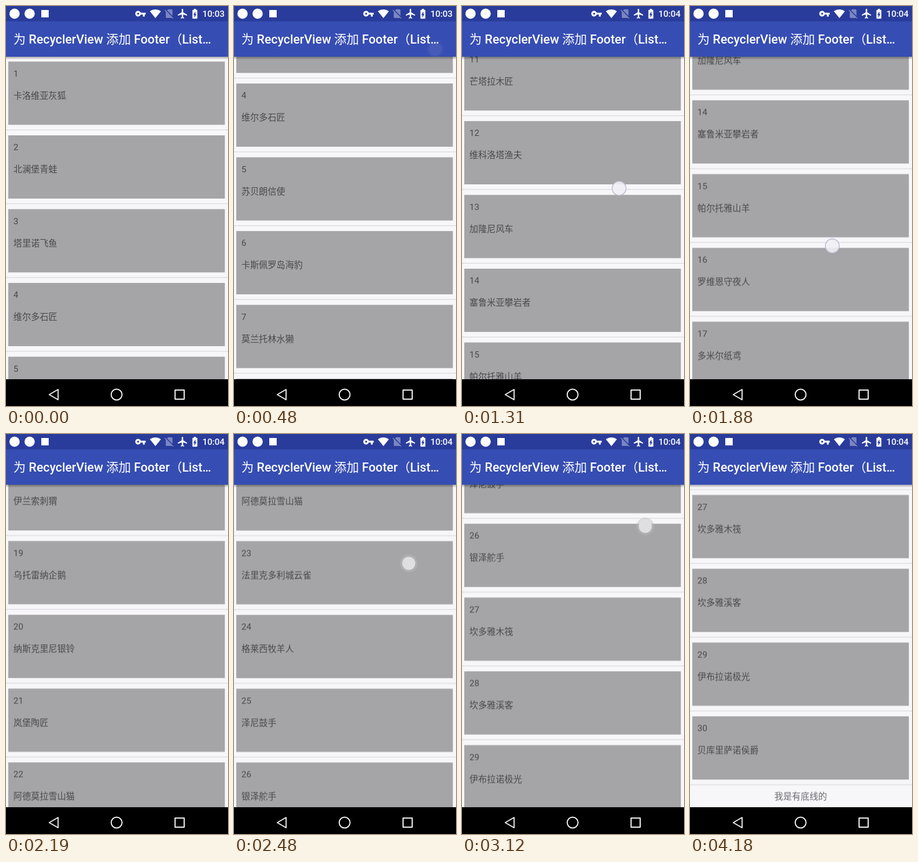
Recreate the animation shown at these times as an HTML page. Size 390 px wide and 702 px high, loop 4.35 s.

```html
<!DOCTYPE html>
<html lang="zh-CN">
<head>
<meta charset="utf-8">
<title>RecyclerView Footer</title>
<style>
  html, body { margin: 0; width: 100%; height: 100%; overflow: hidden; background: #f7f6f9; }
  svg { display: block; width: 390px; height: 702px; }
  text { font: 15.4px Roboto, "Noto Sans CJK SC", "Noto Sans CJK", sans-serif; fill: #4a494c; white-space: pre; }
  .bar text { font-weight: 500; fill: #fff; }
  .bar .title { font-size: 21.7px; }
  .icons { fill: #fff; }
  .nav { fill: none; stroke: #f2f2f2; stroke-width: 2; }
</style>
</head>
<body>
<svg viewBox="0 0 390 702">
  <defs>
    <linearGradient id="shade" x2="0" y2="1">
      <stop stop-color="#000" stop-opacity=".32"/>
      <stop offset="1" stop-color="#000" stop-opacity="0"/>
    </linearGradient>
  </defs>
  <rect width="390" height="702" fill="#f7f6f9"/>
  <g id="list"></g>

  <g class="bar">
    <rect y="89" width="390" height="5" fill="url(#shade)"/>
    <rect width="390" height="89" fill="#364db3"/>
    <rect width="390" height="27" fill="#293c9c"/>
    <text class="title" x="13" y="66">为 RecyclerView 添加 Footer（List…</text>
    <g class="icons">
      <circle cx="15" cy="13.5" r="9"/>
      <circle cx="41.5" cy="13.5" r="9"/>
      <rect x="62" y="7" width="13" height="13"/>
      <path transform="translate(226.3 3.5) scale(.83)" d="M12.65 10C11.83 7.67 9.61 6 7 6c-3.31 0-6 2.69-6 6s2.69 6 6 6c2.61 0 4.83-1.67 5.65-4H17v4h4v-4h2v-4H12.65zM7 14c-1.1 0-2-.9-2-2s.9-2 2-2 2 .9 2 2-.9 2-2 2z"/>
      <path transform="translate(252.5 3.5) scale(.83)" d="M12 21.5L23.64 7C23.2 6.66 18.7 3 12 3S.8 6.66.36 7z"/>
      <path transform="translate(276.5 3.3) scale(.84)" opacity=".38" d="M19 5c0-1.1-.9-2-2-2h-7L7.66 5.34 19 16.68zM3.65 3.88L2.38 5.15 5 7.77V19c0 1.1.9 2 2 2h10c.35 0 .67-.1.96-.26l1.88 1.88 1.27-1.27z"/>
      <path transform="translate(300.2 3.3) scale(.85)" d="M21 16v-2l-8-5V3.5C13 2.67 12.33 2 11.5 2S10 2.67 10 3.5V9l-8 5v2l8-2.5V19l-2 1.5V22l3.5-1 3.5 1v-1.5L13 19v-5.5z"/>
      <path transform="translate(321.4 3.2) scale(.87)" d="M15.67 4H14V2h-4v2H8.33C7.6 4 7 4.6 7 5.33v15.34C7 21.4 7.6 22 8.33 22h7.34c.73 0 1.33-.6 1.33-1.33V5.33C17 4.6 16.4 4 15.67 4zM11 20v-5.5H9L13 7v5.5h2z"/>
    </g>
    <text id="early" x="345" y="19.3">10:03</text>
    <text id="late" x="345" y="19.3">10:04</text>
  </g>

  <rect y="655" width="390" height="47"/>
  <g class="nav">
    <path d="M91.5 673v18L76 682z" stroke-linejoin="round"/>
    <circle cx="194.3" cy="682" r="9.5"/>
    <rect x="297" y="674" width="16" height="16" stroke-linejoin="round"/>
  </g>

  <g id="dot">
    <g id="halo">
      <circle r="15.5" fill="#bcbbbe" fill-opacity=".45"/>
      <circle r="11.5" fill="#dfdee0"/>
    </g>
    <circle id="ring" r="12.2" fill="#f0eff3" fill-opacity=".9" stroke="#c0bbd3" stroke-width="1.5"/>
  </g>
</svg>

<script>
const LOOP = 4350, PITCH = 129.5, TOP = 97.5;
const $ = id => document.getElementById(id);

const teams = `卡洛维亚灰狐 北澜堡青蛙 塔里诺飞鱼 维尔多石匠 苏贝朗信使 卡斯佩罗岛海豹
莫兰托林水獭 贝洛尼铁匠 雾城38人 奥尔迪白鹭 芒塔拉木匠 维科洛塔渔夫 加隆尼风车
塞鲁米亚攀岩者 帕尔托雅山羊 罗维恩守夜人 多米尔纸鸢 伊兰索刺猬 乌托雷纳企鹅
纳斯克里尼银铃 岚堡陶匠 阿德莫拉雪山猫 法里克多利城云雀 格莱西牧羊人 泽尼鼓手
银泽舵手 坎多雅木筏 坎多雅溪客 伊布拉诺极光 贝库里萨诺侯爵`.split(/\s+/);

$('list').innerHTML = teams.map((name, i) => `
  <g transform="translate(0 ${TOP + i * PITCH})">
    <rect x="4" width="380.5" height="111" fill="#a5a4a6"/>
    <rect y="119.5" width="390" height="1" fill="#d3d2d6"/>
    <text x="13" y="26">${i + 1}</text>
    <text x="13" y="65">${name}</text>
  </g>`).join('') +
  `<text x="194.5" y="${TOP + (teams.length - 1) * PITCH + 146}" text-anchor="middle" style="fill:#69686e">我是有底线的</text>`;

// Bursts of redraws: start, end, count
const bursts = [
  [300, 780, 7], [860, 1310, 7], [1410, 1880, 7],
  [1960, 2480, 8], [2580, 3040, 7], [3120, 3350, 4]
];
const times = [0, ...bursts.flatMap(([a, b, n]) =>
  Array.from({ length: n }, (_, i) => a + (b - a) * i / (n - 1)))];

// Scroll offset: time, px
const scroll = [
  [240, 0], [460, 350], [540, 430], [780, 775], [1160, 1190], [1240, 1225],
  [1310, 1320], [1500, 1570], [1800, 1612], [1880, 1615.5], [2060, 1970],
  [2330, 2565], [2480, 2758.5], [2600, 2890], [2900, 2930], [3120, 3177.5], [3350, 3357.5]
];

// Finger height during each swipe: time, y
const swipes = [
  [[290, 380], [470, 58]],
  [[560, 421], [780, 58]],
  [[1230, 421], [1310, 320], [1500, 58]],
  [[1880, 421], [2060, 58]],
  [[2330, 421], [2480, 227], [2600, 58]],
  [[2900, 421], [3120, 162], [3210, 58]]
];
const path = [[58, 360], [162, 322], [227, 307], [320, 276], [421, 250]];

function lerp(keys, v) {
  if (v <= keys[0][0]) return keys[0][1];
  const i = keys.findIndex(k => k[0] >= v);
  if (i < 0) return keys[keys.length - 1][1];
  const [a, p] = keys[i - 1], [b, q] = keys[i];
  return p + (q - p) * (v - a) / (b - a);
}

function finger(t) {
  const s = swipes.find(k => t >= k[0][0] && t <= k[k.length - 1][0]);
  if (!s) return { x: 0, y: 0, show: 0, fresh: 0 };
  const y = lerp(s, t);
  return { x: lerp(path, y), y, show: y < 90 ? .1 : 1, fresh: y > 290 ? 1 : 0 };
}

function play(id, pose) {
  const frames = times.map(t => ({
    offset: Math.max(0, t - 2) / LOOP, easing: 'steps(1, end)', ...pose(t)
  }));
  frames.push({ ...frames[frames.length - 1], offset: 1 });
  $(id).animate(frames, { duration: LOOP, iterations: Infinity });
}

play('list', t => ({ transform: `translate(0px, ${-lerp(scroll, t)}px)` }));
play('dot', t => {
  const f = finger(t);
  return { transform: `translate(${f.x}px, ${f.y}px)`, opacity: f.show };
});
play('ring', t => ({ opacity: finger(t).fresh }));
play('halo', t => ({ opacity: 1 - finger(t).fresh }));
play('early', t => ({ opacity: t < 1010 ? 1 : 0 }));
play('late', t => ({ opacity: t < 1010 ? 0 : 1 }));
</script>
</body>
</html>
```
